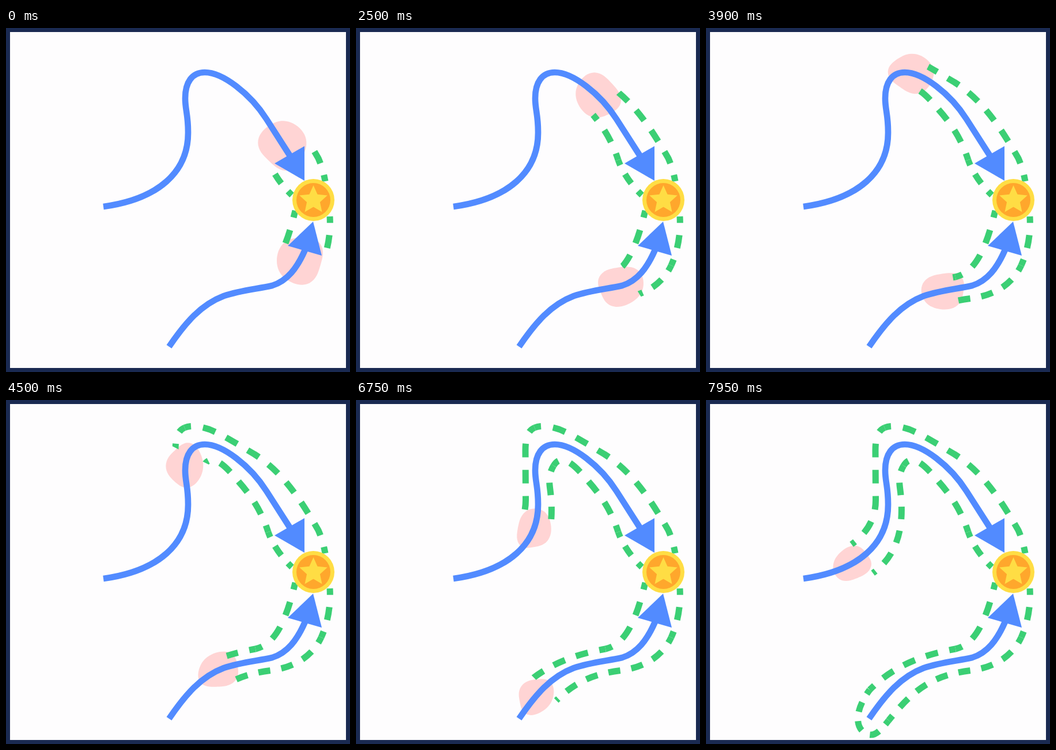
Animation, 597 px wide and 597 px high, one loop 8000 ms. Source, as an HTML page:

```html
<!DOCTYPE html>
<html lang="en">
<head>
<meta charset="utf-8">
<title>Two paths to a coin</title>
<style>
  html, body { margin: 0; width: 100%; height: 100%; overflow: hidden; background: #fefdfe; }
  svg { display: block; width: 597px; height: 597px; }
  .outline path { fill: none; stroke: #3bcf74; stroke-width: 11; stroke-dasharray: .52 .48; stroke-dashoffset: .26; }
  .reveal { fill: none; stroke: #fff; stroke-width: 130; }
  .blob { fill: #ffd4d4; }
  .line { fill: none; stroke: #528bff; stroke-width: 10.7; }
  .head { fill: #528bff; }
  .gold { fill: #ffdd44; }
</style>
</head>
<body>
<svg id="stage" viewBox="0 0 597 597">
  <rect width="597" height="597" fill="#1a2a52"/>
  <rect x="7" y="7" width="583" height="583" fill="#fefdfe"/>
  <g id="blobs"></g>
  <g id="outlines"></g>
  <g id="arrows"></g>
  <circle class="gold" cx="533.5" cy="298.5" r="36.5"/>
  <circle fill="#ffa72c" cx="533.5" cy="298.5" r="29.5"/>
  <polygon id="star" class="gold"/>
</svg>
<script>
const LOOP = 8000, FIRST_STEP = 850, PERIOD = 1562, GLIDE = 1400;
const LEAD = 20;   // the outline ends this far ahead of the blob
const TAIL = 70;   // the reveal runs on past the tail of the line
const $ = id => document.getElementById(id);

// from, step: blob distance from the arrowhead and its advance per step
// outline: curve sections, each with the number of dashes it holds
const routes = [
  {
    line: 'M169 310C264 297 317 250 316 180C316 150 311 142 311 122C311 94 323 77 345 77C376 77 424 114 452 158L493 222',
    head: '518,265 466,235 518,205',
    from: 23, step: 89.5,
    outline: [
      ['M554 266C551 250 548 240 542 226C510 171 480 125 431 94C405 79 380 62 353 51C338 46 322 43 310 48', 8],
      ['M310 48C298 53 294 66 294 88L294.5 172C295 205 280 232 249 253', 5],
      ['M496 290C480 275 463 252 455 229', 2],
      ['M455 229C444 195 428 169 404 142C385 119 358 88 343 114', 4],
      ['M343 114C331 133 337 150 338 165C343 215 339 290 248 322', 6]
    ]
  },
  {
    line: 'M283 553C311 512 338 480 378 465C408 455 436 453 462 447C488 439 505 417 519 385',
    head: '533,336 489,378 548,395',
    from: 20, step: 59,
    outline: [
      ['M562 327C564 360 557 390 547 412', 2],
      ['M547 412C530 448 497 464 462 469C395 477 362 500 317 556', 7],
      ['M317 556C300 578 292 582 284 581C262 577 252 547 284 503', 4],
      ['M284 503C322 465 370 443 433 432', 4],
      ['M433 432C470 424 488 375 502 317', 3]
    ]
  }
];

function add(parent, tag, attrs) {
  const node = document.createElementNS('http://www.w3.org/2000/svg', tag);
  for (const name in attrs) node.setAttribute(name, attrs[name]);
  return parent.appendChild(node);
}

function build(route, i) {
  route.path = add($('arrows'), 'path', { class: 'line', d: route.line });
  add($('arrows'), 'polygon', { class: 'head', points: route.head });
  route.blob = add($('blobs'), 'path', { class: 'blob' });
  route.length = route.path.getTotalLength();

  const a = route.path.getPointAtLength(0), b = route.path.getPointAtLength(1);
  const tail = `M${a.x + TAIL * (a.x - b.x)} ${a.y + TAIL * (a.y - b.y)}L`;
  const mask = add($('outlines'), 'mask', {
    id: 'reveal' + i, maskUnits: 'userSpaceOnUse', x: 0, y: 0, width: 597, height: 597
  });
  route.reveal = add(mask, 'path', { class: 'reveal', d: tail + route.line.slice(1) + 'L533 298' });

  const group = add($('outlines'), 'g', { class: 'outline', mask: `url(#reveal${i})` });
  route.outline.forEach(([d, dashes]) => add(group, 'path', { d, pathLength: dashes }));
}

// Steps taken so far; each one glides out to a short rest
function stepsAt(t) {
  const x = (t - FIRST_STEP) / PERIOD;
  if (x < 0) return 0;
  const k = Math.min(1, (x % 1) * PERIOD / GLIDE);
  return Math.floor(x) + 1 - (1 - k) ** 3;
}

// Wobbly oval lying along the line
function blobShape(route, dist, size) {
  const at = route.length - dist, done = dist / route.length;
  const p = route.path.getPointAtLength(at);
  const q = route.path.getPointAtLength(at - 8), r = route.path.getPointAtLength(at + 8);
  const turn = Math.atan2(r.y - q.y, r.x - q.x);
  const long = size * (43 - 11 * done), wide = size * (28 + 13 * (1 - done) ** 2);
  const points = Array.from({ length: 60 }, (_, i) => {
    const a = i * Math.PI / 30;
    const wobble = 1 + 0.05 * Math.sin(3 * a + dist / 40) + 0.03 * Math.sin(4 * a - dist / 60);
    const u = long * wobble * Math.cos(a), v = wide * wobble * Math.sin(a);
    return [p.x + u * Math.cos(turn) - v * Math.sin(turn), p.y + u * Math.sin(turn) + v * Math.cos(turn)];
  });
  return 'M' + points.join('L') + 'Z';
}

function draw(t) {
  const steps = stepsAt(t);
  for (const route of routes) {
    const dist = route.from + route.step * steps;
    // the blob shrinks away at the tail while the outline closes
    const size = Math.max(0, Math.min(1, (route.length - dist) / 40));
    const cut = TAIL + route.length - dist + LEAD - (TAIL + LEAD) * (1 - size);
    route.blob.setAttribute('d', blobShape(route, dist, size));
    route.reveal.setAttribute('stroke-dasharray', `0 ${Math.max(0, cut)} 2000`);
  }
}

routes.forEach(build);
$('star').setAttribute('points', Array.from({ length: 10 }, (_, i) => {
  const r = i % 2 ? 12 : 25.5, a = (i / 5 - 0.5) * Math.PI;
  return [533.5 + r * Math.cos(a), 298.5 + r * Math.sin(a)];
}).join(' '));

let start;
function tick(now) {
  start ??= now;
  draw((now - start) % LOOP);
  requestAnimationFrame(tick);
}
draw(0);
requestAnimationFrame(tick);
</script>
</body>
</html>
```
